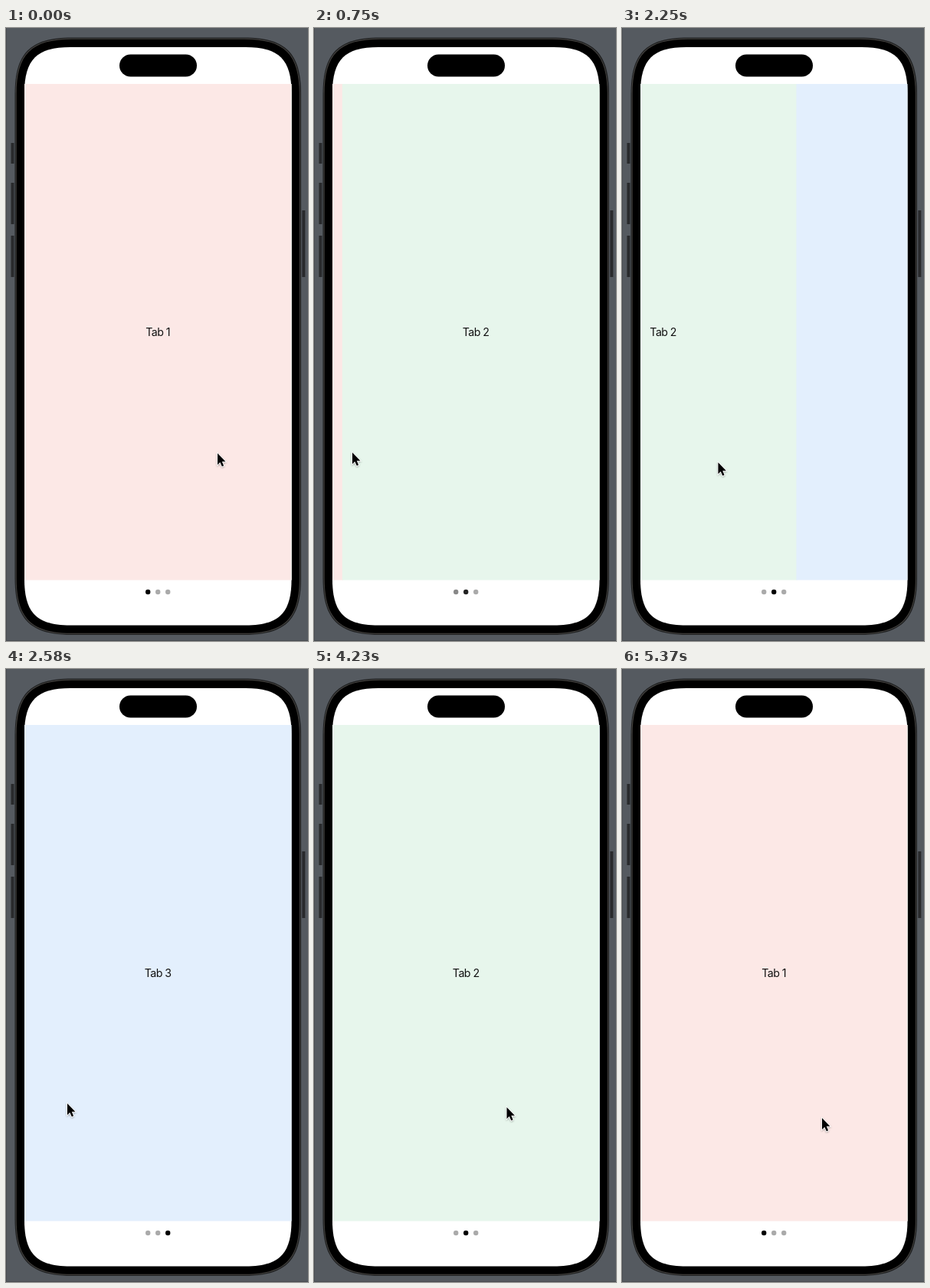
These frames come from a looping animation (394x800 px, 5.55 s). An HTML page:

```html
<!DOCTYPE html>
<html lang="en">
<head>
<meta charset="utf-8">
<title>Paged tabs</title>
<style>
html, body { margin: 0; width: 100%; height: 100%; overflow: hidden; background: #555a60; }
svg { display: block; }
text { font: 14.2px Inter, sans-serif; letter-spacing: -.55px; text-anchor: middle; fill: #111; }
</style>
</head>
<body>
<svg width="394" height="800" viewBox="0 0 394 800">
  <defs>
    <clipPath id="viewport"><path d="M24 73H372.500V720.500H24Z"/></clipPath>
    <filter id="shadow" x="-50%" y="-50%" width="200%" height="200%">
      <feDropShadow dx="0" dy="1" stdDeviation=".9" flood-opacity=".35"/>
    </filter>
  </defs>
  <path d="M.5 0V799.500H394" fill="none" stroke="#484c51"/>
  <path d="M8.500 150v27M8.500 202v54M8.500 271v54M388.300 238v87" stroke="#292a2c" stroke-width="4"/>
  <g id="body"></g>
  <rect x="148" y="34.500" width="101" height="29" rx="14.500"/>
  <g clip-path="url(#viewport)"><g id="pages"></g></g>
  <g id="dots"></g>
  <path id="cursor" d="M0 0V15L3.300 11.800 5.800 17.300 8.100 16.300 5.800 10.800H10.400Z"
    stroke="#fff" stroke-width="1.500" paint-order="stroke" filter="url(#shadow)"/>
</svg>
<script>
const LOOP = 5550, STEP = 30, PAGE = 348, SLOP = 5, SETTLE = 220;
const SCREEN = { x: 24, y: 25, w: 348.5, h: 754.5, corner: 60 };
const $ = id => document.getElementById(id);

// Rounded rectangle with continuous corners, grown outwards from the screen
function shell(grow, fill) {
  const w = SCREEN.w + 2 * grow, h = SCREEN.h + 2 * grow;
  const e = SCREEN.corner + grow * 1.15, k = e * .73, rest = e - k;
  return `<path fill="${fill}" d="M${SCREEN.x - grow} ${SCREEN.y - grow + e}
    c0 ${-k} ${rest} ${-e} ${e} ${-e} h${w - 2 * e} c${k} 0 ${e} ${rest} ${e} ${e}
    v${h - 2 * e} c0 ${k} ${-rest} ${e} ${-e} ${e} h${2 * e - w} c${-k} 0 ${-e} ${-rest} ${-e} ${-e}z"/>`;
}
$('body').innerHTML = shell(12.5, '#1f2021') + shell(11.3, '#454340')
  + shell(10.3, '#000') + shell(0, '#fff');

const colors = ['#fce8e6', '#e7f6ec', '#e3effd'];
$('pages').innerHTML = colors.map((color, i) => `<g transform="translate(${i * PAGE})">
  <rect x="24" y="73" width="349" height="648" fill="${color}"/>
  <text x="198.200" y="402">Tab ${i + 1}</text></g>`).join('');
$('dots').innerHTML = colors.map((_, i) => `<circle cx="${185.2 + i * 13}" cy="736" r="3.200"/>`).join('');
const dots = [...$('dots').children];

// Each move continues from where the pointer was; swipe is the page change it drags
const home = { x: 276, y: 555 };
const moves = [
  { start: 30, end: 600, x: 50, y: 554, swipe: 1 },
  { start: 1078, end: 1665, x: 275, y: 567 },
  { start: 1740, end: 2342, x: 80, y: 567, swipe: 1 },
  { start: 3040, end: 3210, x: 89, y: 567 },
  { start: 3415, end: 3840, x: 256, y: 572, swipe: -1 },
  { start: 4218, end: 4650, x: 94, y: 583 },
  { start: 4785, end: 5145, x: 261, y: 586, swipe: -1 },
];

const progress = (t, from, to) => Math.min(1, Math.max(0, (t - from) / (to - from)));
const mix = (a, b, k) => a + (b - a) * k;
const smooth = k => k * k * (3 - 2 * k);

function stateAt(t) {
  let { x, y } = home, scroll = 0, current = 0;
  for (const { start, end, swipe = 0, ...to } of moves) {
    const k = progress(t, start, end);
    const before = x;
    x = mix(x, to.x, swipe > 0 ? k ** 1.6 : k);
    y = mix(y, to.y, smooth(k));
    const dragged = Math.max(0, Math.abs(x - before) - SLOP);
    const settled = 1 - (1 - progress(t, end, end + SETTLE)) ** 2;
    scroll += swipe * mix(dragged, PAGE, settled);
    current += swipe * progress(t, end + 30, end + 180);
    if (t < end) break;
  }
  return { x, y, scroll, current };
}

function draw(now) {
  const { x, y, scroll, current } = stateAt(Math.floor(now % LOOP / STEP) * STEP);
  $('pages').setAttribute('transform', `translate(${-scroll})`);
  $('cursor').setAttribute('transform', `translate(${x} ${y})`);
  dots.forEach((dot, i) => {
    const shade = 170 * Math.min(1, Math.abs(current - i));
    dot.setAttribute('fill', `rgb(${shade},${shade},${shade})`);
  });
}

const begin = performance.now();
function frame() {
  draw(performance.now() - begin);
  requestAnimationFrame(frame);
}
frame();
</script>
</body>
</html>
```
